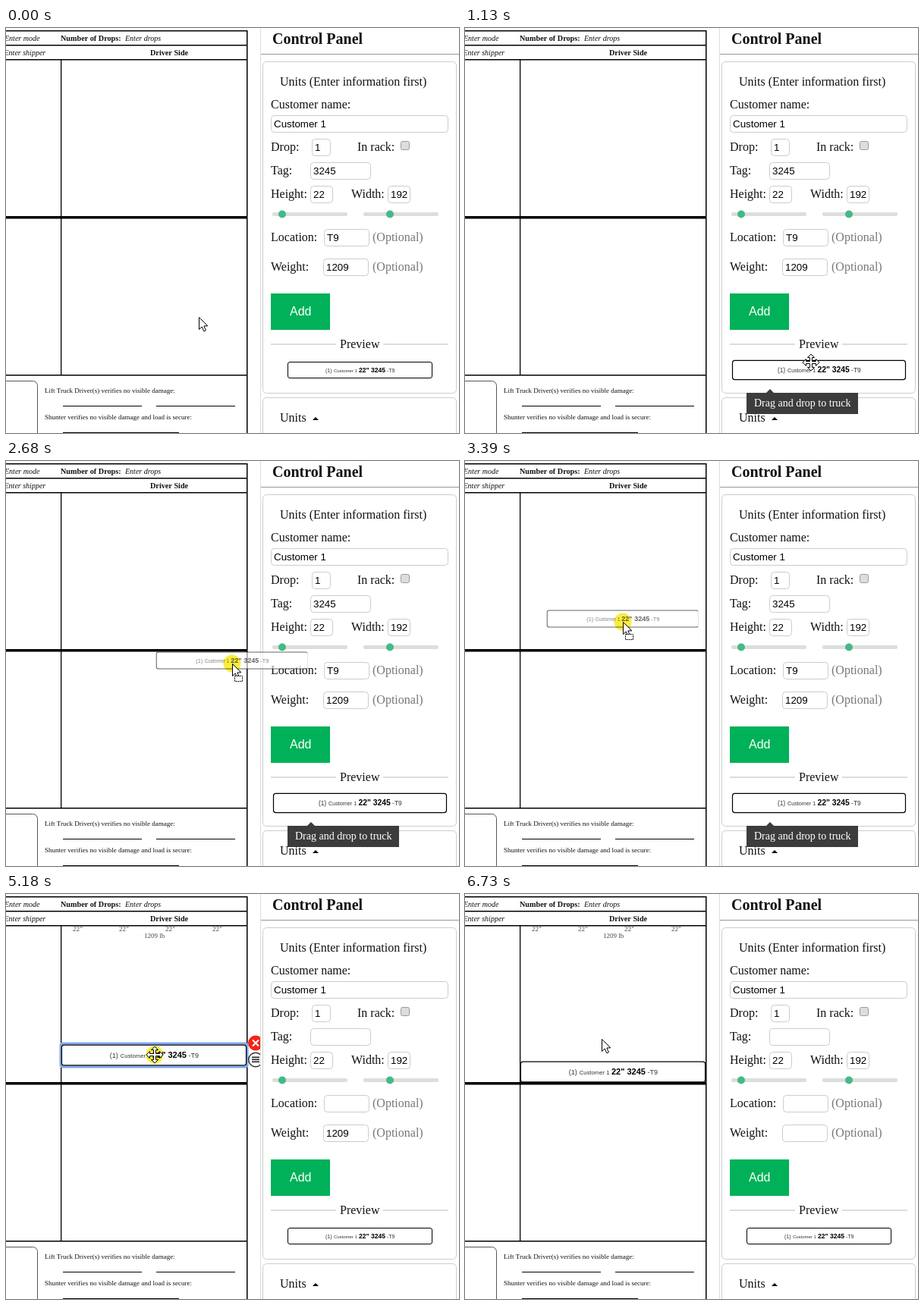
An HTML page with a canvas that plays this animation: 597x534 px, repeating every 7.66 s.

```html
<!DOCTYPE html>
<html lang="en">
<head>
<meta charset="utf-8">
<title>Drag and drop to truck</title>
<style>
  html, body { margin: 0; width: 100%; height: 100%; overflow: hidden; background: #fff; }
  canvas { display: block; }
</style>
</head>
<body>
<canvas id="stage" width="597" height="534"></canvas>
<script>
const ctx = document.getElementById('stage').getContext('2d');
const LOOP = 7660;
const SERIF = '"Liberation Serif", serif', SANS = '"Liberation Sans", sans-serif';

// ---- drawing helpers ----
function text(str, x, y, size, { family = SERIF, style = '', color = '#111' } = {}) {
  ctx.font = `${style} ${size}px ${family}`;
  ctx.fillStyle = color;
  ctx.fillText(str, x, y);
}
function bar(x, y, w, h, color = '#000') {
  ctx.fillStyle = color;
  ctx.fillRect(x, y, w, h);
}
function box(x, y, w, h, r, { fill, stroke, line = 1 } = {}) {
  ctx.beginPath();
  ctx.roundRect(x, y, w, h, r);
  if (fill) { ctx.fillStyle = fill; ctx.fill(); }
  if (stroke) { ctx.strokeStyle = stroke; ctx.lineWidth = line; ctx.stroke(); }
}
function disc(x, y, r, fill, stroke) {
  ctx.beginPath();
  ctx.arc(x, y, r, 0, 2 * Math.PI);
  ctx.fillStyle = fill;
  ctx.fill();
  if (stroke) { ctx.strokeStyle = stroke; ctx.lineWidth = 1.5; ctx.stroke(); }
}
function polygon(points, fill, stroke) {
  ctx.beginPath();
  points.forEach(([x, y]) => ctx.lineTo(x, y));
  ctx.closePath();
  ctx.fillStyle = fill;
  ctx.fill();
  if (stroke) { ctx.strokeStyle = stroke; ctx.lineWidth = 1; ctx.stroke(); }
}
function at(x, y, draw) {
  ctx.save();
  ctx.translate(x, y);
  draw();
  ctx.restore();
}

// ---- timing helpers ----
const clamp = v => Math.max(0, Math.min(1, v));
const ramp = (t, from, to) => clamp((t - from) / (to - from));
// Screen-capture motion: a fixed number of equal steps, the first one at `from`.
function steps(t, from, to, count) {
  if (t < from) return 0;
  const step = Math.floor((t - from) / (to - from) * (count - 1) + 0.1);
  return Math.min(1, (step + 1) / count);
}
// Position on a path of [progress, x, y] points.
function along(path, p) {
  let i = 1;
  while (i < path.length - 1 && p > path[i][0]) i++;
  const [p0, x0, y0] = path[i - 1], [p1, x1, y1] = path[i];
  const k = clamp((p - p0) / (p1 - p0));
  return [x0 + (x1 - x0) * k, y0 + (y1 - y0) * k];
}

const moves = [
  [450, 1210, 11, [[0, 254, 381], [.27, 316, 378], [.45, 388, 395], [.65, 441, 437], [.91, 456, 441], [1, 462, 443]]],
  [1280, 1440, 3, [[0, 462, 443], [1, 468, 460]]],
  [1910, 1911, 1, [[0, 468, 460], [1, 468, 457]]],
  [2290, 2990, 10, [[0, 468, 457], [.1, 450, 436], [.6, 298, 267], [1, 228, 223]]],
  [3060, 3700, 9, [[0, 228, 223], [.556, 208, 212], [1, 196, 212]]],
  [5410, 5710, 5, [[0, 196, 212], [1, 196, 237]]],
  [6180, 6500, 5, [[0, 196, 237], [1, 180, 191]]],
];
function pointer(t) {
  const move = moves.filter(m => t >= m[0]).pop() || moves[0];
  const [from, to, count, path] = move;
  return along(path, steps(t, from, to, count));
}

// ---- scene parts ----
function sheet() {
  for (const y of [3, 22, 41, 457]) bar(0, y, 318, 1.5);
  bar(317, 3, 1.5, 531);
  bar(72, 41, 1.3, 417);
  bar(0, 248, 318, 3.5);
  const italic = { style: 'italic' }, bold = { style: 'bold' };
  text('Enter mode', -2, 17, 10, italic);
  text('Enter shipper', -2.5, 36, 10, italic);
  text('Number of Drops:', 72, 17, 10.2, bold);
  text('Enter drops', 157, 17, 10, italic);
  text('Driver Side', 190, 36, 10.2, bold);
  box(-20, 465.5, 61.5, 90, 6, { stroke: '#555' });
  text('Lift Truck Driver(s) verifies no visible damage:', 51, 481, 9);
  text('Shunter verifies no visible damage and load is secure:', 51, 516, 9);
  bar(75, 498, 104, 1);
  bar(198, 498, 104, 1);
  bar(75, 533, 153, 1);
}

// Unit label, centred on (x, y); scale 1 is 191 x 22.
function label(x, y, scale, { ring = 0, open = false } = {}) {
  at(x, y, () => {
    ctx.scale(scale, scale);
    if (ring) {
      ctx.globalAlpha *= ring;
      box(-96, -12, 192, 24, 2, { stroke: '#7fa9ea', line: 2.6 });
    }
    if (open) {
      ctx.beginPath();
      ctx.rect(-97, -13, 191.5, 26);
      ctx.clip();
    }
    box(-95, -10.5, 190, 21, 2.5, { fill: '#fff', stroke: '#000' });
    const sans = { family: SANS, color: '#333' };
    text('(1)', -45.5, 2.5, 7, sans);
    text('Customer 1', -34.6, 2.5, 6, sans);
    text('22" 3245', -1.6, 2.8, 8.6, { family: SANS, style: 'bold', color: '#000' });
    text('-T9', 35.5, 2.5, 7, sans);
  });
}

function unit(y, selected) {
  for (const x of [88, 149, 210, 272]) text('22"', x, 49, 9.2, { color: '#444' });
  text('1209 lb', 182, 58, 9, { color: '#444' });
  label(195, y, 1.28, { ring: selected ? 1 : 0 });
  if (!selected) return;
  at(329, y - 16, () => {
    disc(0, 0, 10, '#f22318');
    ctx.strokeStyle = '#fff';
    ctx.lineWidth = 2;
    ctx.beginPath();
    ctx.moveTo(-4, -4); ctx.lineTo(4, 4);
    ctx.moveTo(4, -4); ctx.lineTo(-4, 4);
    ctx.stroke();
  });
  at(329, y + 6, () => {
    disc(0, 0, 9.3, '#fff', '#333');
    for (const dy of [-4, -1, 2]) bar(-5, dy, 10, 1.6, '#222');
  });
}

function field(x, y, w, value = '') {
  box(x + .5, y + .5, w - 1, 22, 4, { fill: '#fff', stroke: '#ccc' });
  text(value, x + 4, y + 16, 13.333, { family: SANS, color: '#000' });
}

function panel(t, hoverAdd) {
  const filled = t < 4310;
  bar(335, 0, 262, 534, '#fff');
  bar(335, 0, 1, 534, '#ddd');
  bar(336, 34, 261, 1, '#999');
  text('Control Panel', 351, 21, 20, { style: 'bold' });
  box(338.5, 44.5, 255, 437, 5, { stroke: '#ccc' });
  box(338.5, 487.5, 255, 80, 5, { stroke: '#ccc' });

  text('Units (Enter information first)', 361, 76, 16);
  text('Customer name:', 349, 106, 16);
  field(349, 115, 234, 'Customer 1');
  text('Drop:', 349, 162, 16);
  field(403, 146, 25, '1');
  text('In rack:', 463, 162, 16);
  box(520.5, 149.5, 11, 11, 2, { fill: '#ddd', stroke: '#999' });
  text('Tag:', 349, 193, 16);
  field(401, 177, 80, filled ? '3245' : '');
  text('Height:', 349, 224, 16);
  field(401, 208, 30, '22');
  text('Width:', 455, 224, 16);
  field(503, 208, 30, '192');
  for (const [x, knob] of [[351, 364], [471, 506]]) {
    box(x, 243, 99, 5, 2, { fill: '#ddd' });
    disc(knob, 245.5, 5, '#45b985');
  }
  text('Location:', 349, 281, 16);
  field(419, 265, 60, filled ? 'T9' : '');
  text('Weight:', 349, 320, 16);
  field(418, 304, 60, t < 6650 ? '1209' : '');
  for (const y of [281, 320]) text('(Optional)', 483, y, 16, { color: '#777' });

  bar(349, 350, 78, 48, hoverAdd ? '#00a352' : '#00b159');
  text('Add', 374, 379, 16, { family: SANS, color: '#fff' });
  bar(349, 416, 86, 2, '#ddd');
  bar(497, 416, 86, 2, '#ddd');
  text('Preview', 440, 422, 16);
  text('Units', 361, 519, 16);
  polygon([[404, 517], [408, 513], [412, 517]], '#000');

  const hover = ramp(t, 880, 1080) * (1 - ramp(t, 4310, 4500));
  label(466.5, 451, 1 + .2 * hover);
  if (hover) tooltip(hover);
}

function tooltip(alpha) {
  ctx.globalAlpha = alpha;
  bar(371, 481, 147, 28, '#3c3c3c');
  polygon([[397, 481], [402, 476], [407, 481]], '#3c3c3c');
  text('Drag and drop to truck', 381, 499, 14, { color: '#fff' });
  ctx.globalAlpha = 1;
}

const arrow = [[.5, .5], [.5, 16.5], [4.2, 13], [6.8, 18.8], [9.4, 17.7], [6.8, 12], [11.8, 11.8]];
const arm = [[-1.5, -1.5], [-1.5, -6.5], [-4.5, -6.5], [0, -11], [4.5, -6.5], [1.5, -6.5]];
const cross = [0, 1, 2, 3].flatMap(turn => arm.map(([x, y]) => {
  for (let i = 0; i < turn; i++) [x, y] = [-y, x];
  return [x, y];
}));

function cursor(x, y, kind) {
  at(x, y, () => {
    if (kind === 'move') return polygon(cross, '#fff', '#000');
    polygon(arrow, '#fff', '#000');
    if (kind === 'drag') {
      ctx.setLineDash([2, 1]);
      box(3.5, 16.5, 10, 7, 0, { fill: '#fff', stroke: '#000' });
    }
  });
}

function draw(t) {
  const [x, y] = pointer(t);
  const dragging = t >= 2290 && t < 4310;
  const dropped = t >= 4310;
  const pressed = (t >= 2140 && t < 4310) || (t >= 5180 && t < 6010) || (t >= 6650 && t < 6730);
  const hoverAdd = x >= 349 && x < 427 && y >= 350 && y < 398;
  const unitY = 212.5 + (t < 6010 ? 23 * steps(t, 5410, 5710, 5) : 22);
  const overPreview = t < 2290 && x > 371 && y >= 437;
  const overUnit = dropped && y > 219 - (t < 6010 ? 30 : 0);

  bar(0, 0, 597, 534, '#fff');
  sheet();
  if (dropped) unit(unitY, t < 6650);
  panel(t, hoverAdd);
  if (dragging) {
    ctx.globalAlpha = .6;
    label(x, y - 4, 1.05, { open: true });
    ctx.globalAlpha = 1;
  }
  if (pressed) {
    ctx.globalCompositeOperation = 'multiply';
    disc(x, y, 11.5, '#f8ec40');
    ctx.globalCompositeOperation = 'source-over';
  }
  cursor(x, y, dragging ? 'drag' : overPreview || overUnit ? 'move' : 'arrow');
}

const start = performance.now();
function tick() {
  draw((performance.now() - start) % LOOP);
  requestAnimationFrame(tick);
}
tick();
</script>
</body>
</html>
```
